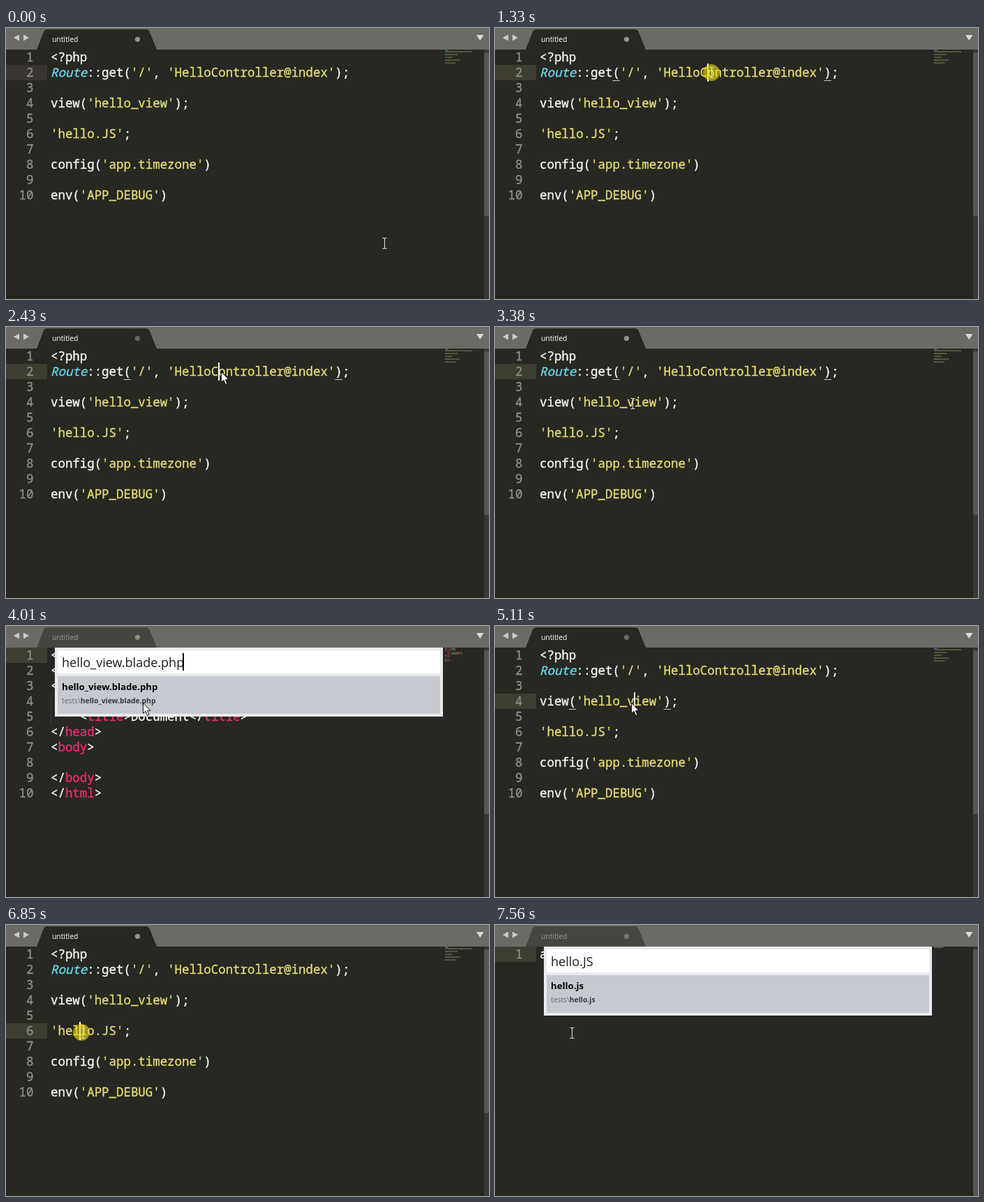
An HTML page for the animation above (8 s loop, 692x389 px).

```html
<!DOCTYPE html>
<html lang="en">
<head>
<meta charset="utf-8">
<title>Editor: go to definition</title>
<style>
  html, body { margin: 0; width: 100%; height: 100%; overflow: hidden; background: #272822; }
  svg { display: block; width: 692px; height: 389px; }
  text { white-space: pre; }
  .code { font: 17.41px "Noto Sans Mono", "DejaVu Sans Mono", monospace; font-variant-ligatures: none; stroke-width: .35; }
  .ui { font-family: "Open Sans", "Noto Sans", sans-serif; }
  .num { fill: #8f908a; stroke: #8f908a; text-anchor: end; }
  .w { fill: #f8f8f2; stroke: #f8f8f2; }
  .s { fill: #e6db74; stroke: #e6db74; }
  .k { fill: #f92672; stroke: #f92672; }
  .g { fill: #a6e22e; stroke: #a6e22e; }
  .i { fill: #66d9ef; stroke: #66d9ef; font-style: italic; }
</style>
</head>
<body>
<svg id="stage" viewBox="0 0 692 389" xmlns="http://www.w3.org/2000/svg"></svg>
<script>
const LOOP = 8000, STEP = 78.8, FIRST = 70;
const LEFT = 64, CHAR = 10.446, ROW = 22, TOP = 31;
const stage = document.getElementById('stage');

function add(parent, tag, attrs = {}, text) {
  const el = document.createElementNS('http://www.w3.org/2000/svg', tag);
  for (const name in attrs) el.setAttribute(name, attrs[name]);
  if (text !== undefined) el.textContent = text;
  parent.appendChild(el);
  return el;
}
const rect = (parent, x, y, width, height, fill, more) =>
  add(parent, 'rect', { x, y, width, height, fill, ...more });
const set = (el, attrs) => { for (const name in attrs) el.setAttribute(name, attrs[name]); };
const show = (el, on) => el.setAttribute('visibility', on ? 'visible' : 'hidden');
const colX = col => LEFT + col * CHAR;
const rowY = row => TOP + (row - 1) * ROW;

// Each line is a list of [class, text] tokens.
const call = (name, arg, end) => [['w', name + '('], ['s', `'${arg}'`], ['w', end]];
const tag = (name, close) => [['w', close ? '</' : '<'], ['k', name], ['w', '>']];

const docs = {
  main: {
    thumb: 270,
    lines: [
      [['w', '<?php']],
      [['i', 'Route'], ['w', '::get('], ['s', "'/'"], ['w', ', '], ['s', "'HelloController@index'"], ['w', ');']],
      [], call('view', 'hello_view', ');'),
      [], [['s', "'hello.JS'"], ['w', ';']],
      [], call('config', 'app.timezone', ')'),
      [], call('env', 'APP_DEBUG', ')')
    ]
  },
  controller: {
    thumb: 263, active: 7, guide: [7, 9], word: [7, 20, 5],
    lines: [
      [['w', '<?php']], [],
      [['k', 'namespace'], ['w', ' App;']], [],
      [['i', 'class'], ['w', ' '], ['g', 'HelloController']],
      [['w', '{']],
      [['w', '    '], ['k', 'public'], ['w', ' '], ['i', 'function'], ['w', ' '], ['g', 'index'], ['w', '()']],
      [['w', '    {']], [['w', '    }']], [['w', '}']], []
    ]
  },
  blade: {
    thumb: 270, active: 1, guide: [4, 5],
    lines: [
      [['w', '<!'], ['k', 'DOCTYPE'], ['w', ' html>']],
      [['w', '<'], ['k', 'html'], ['w', ' '], ['g', 'lang'], ['w', '='], ['s', '"en"'], ['w', '>']],
      tag('head'),
      [['w', '    <'], ['k', 'meta'], ['w', ' '], ['g', 'charset'], ['w', '='], ['s', '"UTF-8"'], ['w', '>']],
      [['w', '    '], ...tag('title'), ['w', 'Document'], ...tag('title', true)],
      tag('head', true), tag('body'), [], tag('body', true), tag('html', true)
    ]
  },
  script: { thumb: 389, active: 1, lines: [[['w', "alert('hello')"]]] }
};

const panels = [
  { from: 1490, to: 2430, doc: 'controller', input: 'HelloController.php@index', caret: 308, method: 'index' },
  { from: 4010, to: 5110, doc: 'blade', input: 'hello_view.blade.php', caret: 254, file: 'hello_view.blade.php' },
  { from: 7010, to: LOOP, doc: 'script', input: 'hello.JS', caret: 142, file: 'hello.js' }
];

const clicks = [
  { at: 1330, row: 2, col: 23, brackets: [10, 39], x: 310, y: 64 },
  { at: 3780, row: 4, col: 13, brackets: [4, 17], x: 197, y: 109 },
  { at: 6770, row: 6, col: 4, brackets: [], x: 108, y: 154 }
];

// Stepped opacity: [time, value]
const textBlink = [[0, 0], [1330, 1], [2820, .6], [2900, .3], [2980, 0], [3540, .5], [3620, 1],
  [5580, .6], [5660, .3], [5740, 0], [6220, .5], [6380, 1], [6610, .6], [6690, .3], [6770, 1]];
const inputBlink = [[0, 0], [1490, 1], [1800, .5], [1880, .25], [2040, .1],
  [4010, 1], [4400, .6], [4480, .3], [4560, 0], [7010, 1], [7400, .6], [7480, .3], [7560, 0]];

// Pointer moves: start, end, target
const moves = [[-9, 860, 312.5, 68], [860, 1020, 310.5, 64], [2741, 3380, 197.5, 110], [5500, 6060, 110.5, 155]];

function buildDoc(doc) {
  const g = add(stage, 'g');
  if (doc.active) rect(g, 0, rowY(doc.active), 59, ROW, '#3e3d32');
  if (doc.word) {
    const [row, col, len] = doc.word;
    rect(g, colX(col) - .5, rowY(row) + 1, len * CHAR + 2, 22, '#3b3a32', { rx: 3 });
  }
  if (doc.guide) add(g, 'path', {
    d: `M64.5 ${rowY(doc.guide[0])}V${rowY(doc.guide[1] + 1)}`,
    stroke: '#55564c', 'stroke-dasharray': '1 1'
  });
  doc.lines.forEach((tokens, n) => {
    const y = rowY(n + 1) + 17;
    add(g, 'text', { x: 39.5, y, class: 'code num' }, n + 1);
    const line = add(g, 'text', { x: LEFT, y, class: 'code' });
    let col = 0;
    for (const [cls, text] of tokens) {
      add(line, 'tspan', { class: cls }, text);
      const indent = text.length - text.trimStart().length;
      const width = (text.length - indent) * .95;
      if (width) rect(g, 629 + (col + indent) * .95, 31.5 + n * 2, width, 1.2, '',
        { class: cls, opacity: .4, 'stroke-width': 0 });
      col += text.length;
    }
  });
  rect(g, 685, 31, 7, 358, '#383933');
  rect(g, 685, 35, 7, doc.thumb - 35, '#565750', { rx: 2 });
  return g;
}

function buildPanel(p) {
  const g = add(stage, 'g', { class: 'ui' });
  const rowHeight = p.file ? 54 : 32;
  rect(g, 70, 31, 556, rowHeight + 45, '#eaebee');
  rect(g, 74, 35, 548, 33, '#fff');
  rect(g, 74, 72, 548, rowHeight, '#c6cad0');
  add(g, 'text', { x: 80, y: 59, 'font-size': 18, fill: '#1c1c1c' }, p.input);
  const pair = (x, y, size, plain, bold, c1, c2) => {
    const t = add(g, 'text', { x, y, 'font-size': size });
    add(t, 'tspan', { fill: c1 }, plain);
    add(t, 'tspan', { fill: c2, 'font-weight': 700 }, bold);
  };
  if (p.file) {
    pair(80, 92, 13.2, '', p.file, '#000', '#000');
    pair(80, 111, 10.35, 'tests\\', p.file, '#666a70', '#363a40');
  } else {
    pair(98, 92, 13.2, 'Method: ', p.method, '#222', '#000');
  }
  const caret = rect(g, p.caret - 1, 39, 2, 25, '#000');
  return { g, caret };
}

rect(stage, 0, 0, 692, 389, '#272822');
const activeRow = rect(stage, 0, 0, 59, ROW, '#3e3d32');
const views = {};
for (const name in docs) views[name] = buildDoc(docs[name]);
rect(stage, 0, 384, 685, 5, '#252620');

rect(stage, 0, 0, 692, 31, '#6a6b65');
const tab = add(stage, 'path', { d: 'M44 31L54 5Q55.5 2 59 2H200Q204 2 205.5 5L216 31Z' });
add(stage, 'path', { d: 'M11 14L19 9.5V18.5ZM33 14L25 9.5V18.5Z', fill: '#cbccc6' });
add(stage, 'path', { d: 'M674 10H684.5L679.2 18Z', fill: '#dcdcd7' });
const tabName = add(stage, 'text', { x: 66, y: 20, class: 'ui', 'font-size': 10.35, 'font-weight': 500 }, 'untitled');
const dot = add(stage, 'circle', { cx: 188.5, cy: 16.3, r: 3.6 });

const marks = add(stage, 'path', { stroke: '#c9c9c0', 'stroke-width': 1 });
const textCaret = rect(stage, 0, 0, 2, 26, '#f8f8f0');
const panelViews = panels.map(buildPanel);

const halo = add(stage, 'circle', { r: 12, fill: '#f0e000', opacity: .6 });
const beam = add(stage, 'path', {
  d: 'M-3 -7.5H-1L0 -6.5L1 -7.5H3M0 -6.5V6.5M-3 7.5H-1L0 6.5L1 7.5H3',
  fill: 'none', stroke: '#dcdcd6', 'stroke-width': 1.1
});
const arrow = add(stage, 'path', {
  d: 'M.5 .5V15.5L4 12.3L6.6 18.5L9 17.5L6.4 11.5H11Z',
  fill: '#fff', stroke: '#111', 'stroke-width': 1
});

function stepped(keys, t) {
  let value = 0;
  for (const [at, v] of keys) if (t >= at) value = v;
  return value;
}

function pointer(t) {
  let x = 542.5, y = 309;
  for (const [from, to, tx, ty] of moves) {
    const p = Math.min(1, Math.max(0, (t - from) / (to - from)));
    const e = p * p * (3 - 2 * p);
    x += (tx - x) * e;
    y += (ty - y) * e;
  }
  return [x, y];
}

function draw(time) {
  const t = time < FIRST - 5 ? 0 : FIRST + 5 + STEP * Math.floor((time - FIRST + 5) / STEP);
  const open = panels.findIndex(p => t >= p.from && t < p.to);
  const panel = panels[open];
  const docName = panel ? panel.doc : 'main';
  for (const name in views) show(views[name], name === docName);

  panelViews.forEach((v, n) => {
    show(v.g, n === open);
    v.caret.setAttribute('opacity', stepped(inputBlink, t));
  });

  const click = clicks.filter(c => t >= c.at).pop();
  const row = click ? click.row : 2;
  set(activeRow, { y: rowY(row), fill: click ? '#3e3d32' : '#393632' });
  show(activeRow, !panel);
  show(textCaret, click && !panel);
  show(marks, click && !panel);
  show(halo, click && !panel && t < click.at + 240);
  if (click) {
    set(textCaret, { x: Math.floor(colX(click.col)), y: rowY(row) - 2, opacity: stepped(textBlink, t) });
    set(marks, { d: click.brackets.map(c => `M${colX(c)} ${rowY(row) + 22.5}h${CHAR}`).join('') });
    set(halo, { cx: click.x, cy: click.y });
  }

  const opening = panel && t < panel.from + 75;
  const closing = panels.some(p => t >= p.to && t < p.to + 75);
  set(tab, { fill: panel ? '#454640' : '#272822' });
  set(tabName, { fill: panel ? '#969791' : '#fff' });
  set(dot, { fill: opening ? '#8c9070' : panel ? '#74756e' : closing ? '#666761' : '#92938d' });

  const [x, y] = pointer(t);
  const pointing = (t >= 1490 && t < 2820) || (t >= 4010 && t < 5580);
  const nudge = t >= 4010 && t < 4950 ? 1 : 0;
  show(beam, !pointing);
  show(arrow, pointing);
  set(beam, { transform: `translate(${Math.floor(x) + .5} ${Math.round(y)})` });
  set(arrow, { transform: `translate(${Math.floor(x) - 2 + nudge} ${Math.round(y)})` });
}

function tick() {
  draw(performance.now() % LOOP);
  requestAnimationFrame(tick);
}
tick();
</script>
</body>
</html>
```
